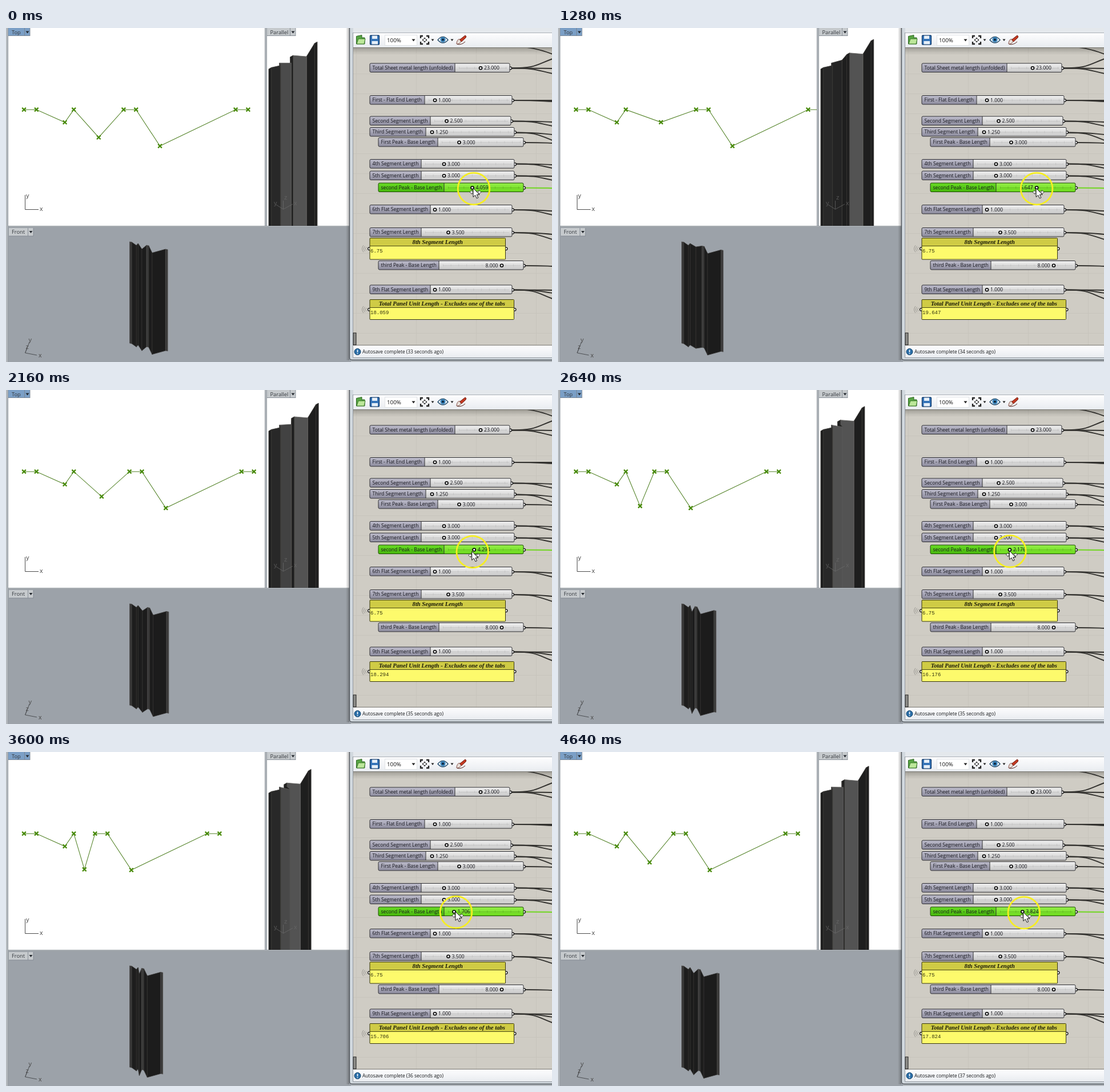
Recreate the animation shown at these times as an HTML page. Size 956 by 586 pixels, loop 4.68 s.

```html
<!DOCTYPE html>
<html lang="en">
<head>
<meta charset="utf-8">
<title>Folded panel sliders</title>
<style>
html, body { margin: 0; width: 100%; height: 100%; overflow: hidden; background: #9ca2a9; }
svg { display: block; width: 956px; height: 586px; font-family: "Open Sans", "Noto Sans", sans-serif; }
.label { font-size: 8.65px; fill: #15151c; }
.tab { font-size: 9.3px; fill: #34383d; }
.axis { font: 11px "Liberation Sans", Arial, sans-serif; }
.head { font: italic bold 10.6px "Liberation Serif", "Times New Roman", serif; text-anchor: middle; fill: #1c1c08; }
.mono { font: 9px "Liberation Mono", monospace; fill: #33330f; }
.wire { fill: none; stroke: #33322f; stroke-width: 1.9; }
</style>
</head>
<body>
<svg id="stage" viewBox="0 0 956 586" xmlns="http://www.w3.org/2000/svg">
  <defs>
    <linearGradient id="name" x2="0" y2="1"><stop stop-color="#bdbccb"/><stop offset="1" stop-color="#8c8b9d"/></linearGradient>
    <linearGradient id="track" x2="0" y2="1"><stop stop-color="#f1f1f1"/><stop offset="1" stop-color="#c6c6c6"/></linearGradient>
    <linearGradient id="nameOn" x2="0" y2="1"><stop stop-color="#69dc25"/><stop offset="1" stop-color="#45b50b"/></linearGradient>
    <linearGradient id="trackOn" x2="0" y2="1"><stop stop-color="#94ef48"/><stop offset="1" stop-color="#6ad81b"/></linearGradient>
    <linearGradient id="bar" x2="0" y2="1"><stop stop-color="#fdfdfe"/><stop offset="1" stop-color="#e9ecf0"/></linearGradient>
    <linearGradient id="fade" x2="0" y2="1"><stop stop-color="#55534d" stop-opacity=".4"/><stop offset="1" stop-color="#55534d" stop-opacity="0"/></linearGradient>
    <linearGradient id="shade"><stop stop-color="#333" stop-opacity="0"/><stop offset="1" stop-color="#333" stop-opacity=".35"/></linearGradient>
    <pattern id="grid" x="718" y="45" width="105" height="35" patternUnits="userSpaceOnUse">
      <path d="M.5 0V35M0 .5H105" stroke="#c7c4bc" fill="none"/>
    </pattern>
    <clipPath id="topClip"><rect x="4" width="449" height="347"/></clipPath>
    <clipPath id="sideClip"><rect x="457" width="145" height="347"/></clipPath>
    <clipPath id="graphClip"><rect x="608" y="35" width="348" height="521"/></clipPath>
  </defs>

  <!-- viewports -->
  <rect width="956" height="586" fill="#b4b9be"/>
  <rect x="4" width="449" height="347" fill="#fff"/>
  <rect x="457" width="145" height="347" fill="#fff"/>
  <rect x="4" y="350" width="600" height="236" fill="#9ca2a9"/>
  <path d="M3.5 0V586M453.5 0V347.5M456.5 0V347.5M4 347.5H602M4 349.5H602" stroke="#959ba1" fill="none"/>
  <g id="front"></g>
  <g id="side" clip-path="url(#sideClip)"></g>
  <g clip-path="url(#topClip)">
    <path id="line" fill="none" stroke="#55842a" stroke-width="1.1"/>
    <path id="marks" fill="none" stroke="#478a08" stroke-width="2.3"/>
  </g>
  <rect x="4" width="38" height="14" fill="#7b9fc6"/>
  <rect x="457" width="50" height="14" fill="#c6cacd"/>
  <rect x="5" y="351" width="43" height="14" fill="#c6cacd"/>
  <path d="M32.5 0V14M42 0V14M497.5 0V14M507 0V14M38.5 351V365M48 351V365M4 13.5H42M457 13.5H507M5 365H48" stroke="#7a828b" stroke-width=".8" fill="none"/>
  <path d="M34.5 5.5h6l-3 4zM499.5 5.5h6l-3 4zM40.5 356h6l-3 4z" fill="#23282e"/>
  <g class="tab"><text x="10" y="10.5">Top</text><text x="462.5" y="10.5">Parallel</text><text x="10" y="361">Front</text></g>
  <g class="axis" fill="#4c4c4c">
    <path d="M33.5 293V318.5H57" fill="none" stroke="#4c4c4c"/>
    <text x="35" y="298">y</text><text x="59" y="321">x</text>
    <path d="M54 574L33.5 570L41 551M33.5 570L37 562" fill="none" stroke="#4c4f53"/>
    <text x="39.5" y="551">y</text><text x="34.5" y="563">z</text><text x="57" y="578">x</text>
  </g>
  <g class="axis" fill="#6d6d6d" opacity=".65">
    <path d="M485.5 303V318L473 310M485.5 318L502 309" fill="none" stroke="#707070"/>
    <text x="469" y="311">y</text><text x="487" y="301">z</text><text x="504" y="311">x</text>
  </g>

  <!-- editor window -->
  <rect x="595" width="6" height="583" fill="url(#shade)"/>
  <path d="M601 0H956V583H606Q601 583 601 578Z" fill="#d2d9df"/>
  <path d="M601.5 0V578Q601.5 582.5 606 582.5H956" fill="none" stroke="#4d5359" stroke-width="1.3"/>
  <path d="M607.5 8V578.5H956" fill="none" stroke="#90979e"/>
  <path d="M608 0H956V8H608Z" fill="#e4e8ec"/>
  <path d="M608 8.5H956" stroke="#a9afb6"/>
  <rect x="608" y="9" width="348" height="25" fill="url(#bar)"/>
  <rect x="608" y="34" width="348" height="522" fill="#cfccc4"/>
  <rect x="608" y="34" width="348" height="522" fill="url(#grid)"/>
  <rect x="608" y="34" width="348" height="12" fill="url(#fade)"/>
  <path d="M608 34.5H956M608 556.5H956" stroke="#77756f"/>
  <rect x="608" y="557" width="348" height="21" fill="url(#bar)"/>
  <rect x="608" y="535" width="5" height="21" fill="#8d8c88" stroke="#222"/>
  <circle cx="615.5" cy="568" r="5.5" fill="#2a6ea8" stroke="#174468"/>
  <path d="M615.5 564.5V569M615.5 570.5V572" stroke="#fff" stroke-width="1.6"/>
  <text id="status" x="624" y="571" font-size="8.38" fill="#16181a"></text>

  <!-- toolbar -->
  <path d="M613.5 28V14.5L623 12.5V17H628V28Z" fill="#58a544" stroke="#2b641f"/>
  <path d="M614 28L617 19H629L627 28Z" fill="#bce79a" stroke="#3a7a2b"/>
  <rect x="637.5" y="13" width="16" height="16" rx="1" fill="#3574b8" stroke="#153d6c" stroke-width="1.3"/>
  <path d="M641 13.5H650V19H641ZM640.5 23H651V28.5H640.5Z" fill="#e6eff8"/>
  <rect x="663.5" y="12.5" width="56" height="18" fill="#fff" stroke="#e0e3e6"/>
  <text x="667" y="24.8" font-size="9.8" fill="#111">100%</text>
  <path d="M710.5 19.5h6l-3 4zM744.5 19.5h5l-2.5 3.5zM778.5 19.5h5l-2.5 3.5z" fill="#222"/>
  <path d="M726 18V14H730M736 14H740V18M740 24V28H736M730 28H726V24" fill="none" stroke="#222" stroke-width="2.3"/>
  <path d="M733 16.5l2 2.5h-4zM733 25.5l2-2.5h-4zM728.5 21l2.5-2v4zM737.5 21l-2.5-2v4z" fill="#222"/>
  <path d="M756 21Q765 10 774 21Q765 31 756 21Z" fill="#f3f8fc" stroke="#28506f" stroke-width="1.4"/>
  <circle cx="765" cy="20.5" r="4.6" fill="#3a83ba"/><circle cx="765" cy="20.5" r="2" fill="#0c2236"/>
  <path d="M789 26Q791 18 795 20L797 23Q794 29 789 28Z" fill="#e8e0da" stroke="#6d2a20" stroke-width=".8"/>
  <path d="M794.5 20.5L804 13Q807 14 805 17L797.5 24Z" fill="#c53a22" stroke="#6d1b10"/>
  <path d="M790 28.5Q798 30 804 24" fill="none" stroke="#55251c"/>

  <g clip-path="url(#graphClip)">
    <g id="wires"></g>
    <g id="sliders"></g>
    <g id="panels"></g>
  </g>
  <g id="pointer">
    <circle r="27.8" fill="none" stroke="#f6ee22" stroke-width="2.8"/>
    <path d="M-7 6l4-3.5v2.3h12V2.5L13 6l-4 3.5V7.2H-3v2.3z" fill="#fff" stroke="#222" stroke-width=".8"/>
    <path d="M-1-1V14.5L2.6 11.3L5.2 16.8L7.8 15.7L5.3 10.4H10Z" fill="#fff" stroke="#111"/>
  </g>
</svg>
<script>
const LOOP = 4680, STEP = 40, LAG = 40;
const $ = id => document.getElementById(id);

function add(parent, tag, attrs, text) {
  const el = document.createElementNS('http://www.w3.org/2000/svg', tag);
  for (const k in attrs) el.setAttribute(k, attrs[k]);
  if (text) el.textContent = text;
  return parent.appendChild(el);
}

// Monotone cubic curve through [time, value] pairs.
function curve(keys) {
  const n = keys.length - 1;
  const slope = i => (keys[i + 1][1] - keys[i][1]) / (keys[i + 1][0] - keys[i][0]);
  const tangent = i => {
    if (i === 0) return slope(0);
    if (i === n) return slope(n - 1);
    const a = slope(i - 1), b = slope(i);
    return a * b <= 0 ? 0 : 2 * a * b / (a + b);
  };
  return t => {
    let i = 0;
    while (i < n - 1 && t > keys[i + 1][0]) i++;
    const [t0, a] = keys[i], [t1, b] = keys[i + 1], h = t1 - t0;
    const u = Math.min(1, Math.max(0, (t - t0) / h)), w = 1 - u;
    return a * w * w * (1 + 2 * u) + b * u * u * (3 - 2 * u)
      + h * u * w * (w * tangent(i) - u * tangent(i + 1));
  };
}

const drag = curve([[-40, 4], [520, 4.765], [1120, 5.6], [1280, 5.647], [1700, 5.7], [2160, 4.294],
  [2640, 2.176], [2860, 1.7], [3150, 1.55], [3400, 1.65], [3600, 1.706], [4600, 3.81], [4640, 3.824]]);
const lead = curve([[0, 2.5], [520, 3], [1280, 0], [2160, -3], [2640, .5], [3600, 3.5], [4640, 2.5]]);
const height = curve([[0, 282], [1280, 282], [2160, 284], [2640, 283], [3600, 281], [4640, 282]]);
const snap = v => Math.round(v * 17) / 17;

// Fold apex over a base, from its two side lengths.
function apex(x, a, b, base) {
  const dx = (a * a - b * b + base * base) / (2 * base);
  return [x + dx, Math.sqrt(Math.max(0, a * a - dx * dx))];
}
function profile(base) {
  const x = 4 + base;
  return [[0, 0], [1, 0], apex(1, 2.5, 1.25, 3), [4, 0], apex(4, 3, 3, base),
    [x, 0], [x + 1, 0], apex(x + 1, 3.5, 6.75, 8), [x + 9, 0], [x + 10, 0]];
}

// Extruded view of the profile: an affine map plus a vertical drop.
function makeView(group, map, drop, tone, order) {
  const faces = order.map(i => [i, add(group, 'path', { 'stroke-width': .8, 'stroke-linejoin': 'round' })]);
  return pts => faces.forEach(([i, el]) => {
    const p = pts[i], q = pts[i + 1];
    const [ax, ay] = map(p), [bx, by] = map(q);
    const g = Math.round(tone(Math.atan2(q[1] - p[1], q[0] - p[0])));
    el.setAttribute('d', `M${ax} ${ay}L${bx} ${by}V${by + drop}L${ax} ${ay + drop}Z`);
    el.setAttribute('fill', `rgb(${g},${g},${g})`);
    el.setAttribute('stroke', `rgb(${g + 24},${g + 23},${g + 21})`);
  });
}
// Brightness of a face, strongest when it is turned to the given angle.
const lit = (dark, gain, facing, power) => a => dark + gain * Math.max(0, Math.cos(a - facing)) ** power;
const leftToRight = [0, 1, 2, 3, 4, 5, 6, 7, 8];
const drawFront = makeView($('front'), ([x, y]) => [216.5 + 3.7 * x - .35 * y, 375 + .77 * x + 3.8 * y],
  178, lit(28, 28, 0, 40), leftToRight);
const drawSide = makeView($('side'), ([x, y]) => [460 + 4.72 * x + 5 * y, 72 - 2.65 * x + 2.4 * y],
  420, lit(30, 54, 1.05, 8), [...leftToRight].reverse());

function grip(parent, x, y) {
  add(parent, 'circle', { cx: x, cy: y, r: 2.4, fill: '#fff', stroke: '#111', 'stroke-width': 1.3 });
}

function slider(x, split, right, y, name, knob, value, on = '') {
  const g = $('sliders'), top = y - 8;
  grip(g, right + 1, y + .5);
  add(g, 'rect', { x, y: top, width: right - x, height: 15.5, rx: 2, fill: `url(#track${on})` });
  add(g, 'path', { d: `M${split} ${top}H${x + 2}Q${x} ${top} ${x} ${top + 2}V${y + 5.5}Q${x} ${y + 7.5} ${x + 2} ${y + 7.5}H${split}Z`, fill: `url(#name${on})` });
  const ink = on ? '#58ae1c' : '#bababa';
  add(g, 'path', { d: `M${split + 7} ${y + .5}H${right - 5}`, stroke: ink, 'stroke-width': .7 });
  add(g, 'path', { d: `M${split + 7} ${y}H${right - 5}`, stroke: ink, 'stroke-width': 4, 'stroke-dasharray': '.7 13', opacity: .8 });
  add(g, 'path', { d: `M${split} ${top}V${y + 7.5}`, stroke: '#333' });
  add(g, 'rect', { x, y: top, width: right - x, height: 15.5, rx: 2, fill: 'none', stroke: on ? '#1c4a05' : '#2e2e33' });
  add(g, 'text', { x: x + 4.5, y: y + 2.8, class: 'label' }, name);
  const dot = add(g, 'circle', { cx: knob, cy: y + .3, r: 2.5, fill: '#fff', stroke: '#000', 'stroke-width': 1.6 });
  const text = add(g, 'text', { y: y + 3.2, class: 'label' });
  const set = (kx, label, before) => {
    dot.setAttribute('cx', kx);
    text.setAttribute('x', before ? kx - 6.5 : kx + 6);
    text.setAttribute('text-anchor', before ? 'end' : 'start');
    text.textContent = label;
  };
  set(knob, value, name.startsWith('third'));
  return set;
}

function panel(x, right, top, bottom, split, title, value) {
  const g = $('panels'), mid = (top + bottom) / 2;
  grip(g, x - 1, mid);
  grip(g, right + 1, mid);
  add(g, 'rect', { x, y: top, width: right - x, height: bottom - top, fill: '#fdfa6c' });
  add(g, 'rect', { x, y: top, width: right - x, height: split - top, fill: '#cfcb45' });
  add(g, 'path', { d: `M${x} ${split}H${right}`, stroke: '#4b4a16' });
  add(g, 'rect', { x, y: top, width: right - x, height: bottom - top, rx: 1, fill: 'none', stroke: '#37360f' });
  add(g, 'path', { d: `M631 ${mid - 3}q-3 3 0 6M628.5 ${mid - 4.5}q-4 4.5 0 9M626 ${mid - 6}q-5 6 0 12`, fill: 'none', stroke: '#96948e', 'stroke-width': .9 });
  add(g, 'text', { x: (x + right) / 2, y: split - 3.7, class: 'head' }, title);
  return add(g, 'text', { x: x + 1, y: split + 11.5, class: 'mono' }, value);
}

// Cables leave each slider and ease towards the right edge.
function wire(x, y, end, color) {
  const m = (x + 956) / 2 + 8;
  const el = add($('wires'), 'path', { d: `M${x} ${y}C${m} ${y} ${m} ${y + (end - y) * .35} 957 ${end}`, class: 'wire' });
  if (color) el.style.stroke = color;
}
[[884, 70.5, 54], [884, 70.5, 71], [884, 70.5, 80], [888, 127, 127], [888, 127, 129], [886, 163.5, 165],
  [886, 163.5, 172], [892, 183.5, 187], [892, 183.5, 197], [908, 201, 202], [892, 238.5, 240], [892, 238.5, 246],
  [892, 259.5, 260], [892, 259.5, 267], [908, 280.5, 281, '#6fd61f'], [888, 319, 321], [888, 319, 328],
  [888, 359, 362], [888, 359, 371], [908, 417, 418], [888, 459.5, 460], [888, 459.5, 465], [888, 459.5, 475]
].forEach(w => wire(...w));
add($('wires'), 'path', { d: 'M912 34Q935 37 957 46', class: 'wire' });

slider(637, 786, 882, 70, 'Total Sheet metal length (unfolded)', 831, '23.000');
slider(637, 733, 886, 126.5, 'First - Flat End Length', 751, '1.000');
slider(637, 743, 884, 163, 'Second Segment Length', 771.5, '2.500');
slider(637, 735, 890, 182.5, 'Third Segment Length', 746, '1.250');
slider(652, 756, 906, 200.5, 'First Peak - Base Length', 793.5, '3.000');
slider(637, 727, 890, 238.5, '4th Segment Length', 767, '3.000');
slider(637, 727, 890, 259, '5th Segment Length', 767, '3.000');
const setPeak = slider(652, 767, 906, 280, 'second Peak - Base Length', 816, '4.059', 'On');
slider(637, 743, 886, 318.5, '6th Flat Segment Length', 751, '1.000');
slider(637, 727, 886, 358.5, '7th Segment Length', 774.5, '3.500');
slider(652, 758, 906, 416.5, 'third Peak - Base Length', 868, '8.000');
slider(637, 743, 886, 459, '9th Flat Segment Length', 751, '1.000');
panel(637, 874.5, 368.5, 406, 382.5, '8th Segment Length', '6.75');
const total = panel(637, 889.5, 476.5, 511.5, 490.5, 'Total Panel Unit Length - Excludes one of the tabs', '18.059');

function draw(t) {
  const v = snap(drag(t));
  const knob = 761.3 + 13.6 * v;
  setPeak(knob, v.toFixed(3), v > 5);
  total.textContent = (14 + v).toFixed(3);
  $('status').textContent = `Autosave complete (${33 + Math.floor((t + 760) / 1160)} seconds ago)`;
  $('pointer').setAttribute('transform', `translate(${knob + lead(t)} ${height(t)})`);

  const pts = profile(snap(drag(t - LAG)));
  const flat = pts.map(([x, y]) => [31.5 + 21.8 * x, 143.2 + 21.8 * y]);
  $('line').setAttribute('d', 'M' + flat.map(p => p.join(' ')).join('L'));
  $('marks').setAttribute('d', flat.map(([x, y]) => `M${x - 3.3} ${y - 3.3}l6.6 6.6m0-6.6l-6.6 6.6`).join(''));
  drawFront(pts);
  drawSide(pts);
}

const start = performance.now();
function tick() {
  const t = (performance.now() - start) % LOOP;
  draw(Math.floor(t / STEP) * STEP);
  requestAnimationFrame(tick);
}
tick();
</script>
</body>
</html>
```
